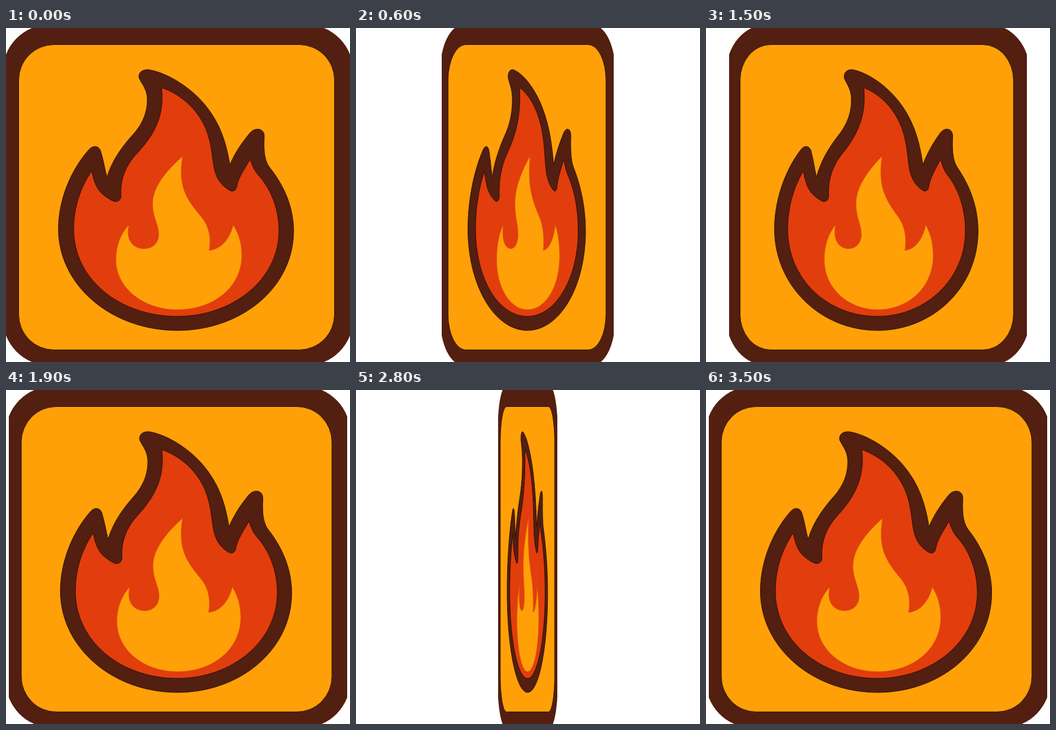
An HTML page that plays this animation: 610 by 593 pixels, repeating every 3600 ms.

```html
<!DOCTYPE html>
<html lang="en">
<head>
<meta charset="utf-8">
<title>Spinning flame badge</title>
<style>
  html, body { margin: 0; width: 100%; height: 100%; overflow: hidden; background: #fff; }
  #badge { position: absolute; top: 0; left: 0; width: 610px; height: 593px; }
  path, rect { vector-effect: non-scaling-stroke; }
  .brown { fill: #521f10; }
  .orange { fill: #ffa008; }
  .red { fill: #e23d0d; }
  .edge { stroke: #2a1006; stroke-width: 1; }
  .core { stroke: #d9600a; stroke-width: .7; }
</style>
</head>
<body>
<svg id="badge" viewBox="0 0 610 593" preserveAspectRatio="none">
  <path class="brown" d="M0 47 A85 85 0 0 1 46 0 H564 A85 85 0 0 1 610 47
    V546 A85 85 0 0 1 564 593 H46 A85 85 0 0 1 0 546 Z"/>
  <rect class="orange edge" x="22.5" y="29.5" width="560" height="542" rx="63"/>
  <path class="brown edge" d="M236 89 C234 80 241 73 253 74
    C289 80 333 109 358 143 C382 175 391 207 397 243
    C405 223 418 204 432 187 C442 175 458 178 458 192
    C457 213 457 233 467 247 C492 278 510 317 510 360
    C510 462 416 537 304 537 C187 537 93 457 93 357
    C93 303 116 251 147 216 C155 207 165 209 168 219
    C173 235 175 250 179 265 C188 235 206 210 228 186
    C248 162 252 139 250 120 C248 106 240 98 236 89 Z"/>
  <path class="red edge" d="M276 106 C313 119 340 146 354 178
    C367 210 365 237 371 256 C375 271 386 283 398 289
    C403 291 408 288 409 282 C412 265 424 249 433 233
    C437 246 442 256 450 264 C472 290 484 324 484 360
    C484 447 401 512 304 512 C202 512 120 446 120 357
    C120 319 132 283 152 254 C156 273 160 283 168 292
    C175 299 184 305 192 308 C199 309 204 305 204 298
    C202 268 213 244 231 224 C266 187 281 153 276 106 Z"/>
  <path class="orange core" d="M313 228 C287 251 260 281 260 312
    C260 337 271 347 271 368 C270 382 261 391 246 392
    C223 392 212 374 218 350 C205 363 195 385 195 411
    C195 462 244 500 304 500 C369 500 418 459 418 404
    C418 383 413 366 403 350 C397 373 383 393 360 395
    C364 372 360 352 346 335 C317 301 305 279 313 228 Z"/>
</svg>
<script>
  const badge = document.getElementById("badge");
  const STAGE = 610, LOOP = 3600, STEP = 100;
  const start = performance.now();

  // One turn per loop in 10° steps; both sides show the same face.
  function draw(now) {
    const step = Math.floor((Math.max(0, now - start) % LOOP) / STEP);
    const turn = Math.abs(Math.cos(step * Math.PI / 18));
    const width = Math.max(1, Math.floor(STAGE * turn + 1e-6));
    badge.style.width = width + "px";
    badge.style.left = Math.floor((STAGE - width) / 2) + "px";
    requestAnimationFrame(draw);
  }
  draw(start);
</script>
</body>
</html>
```
